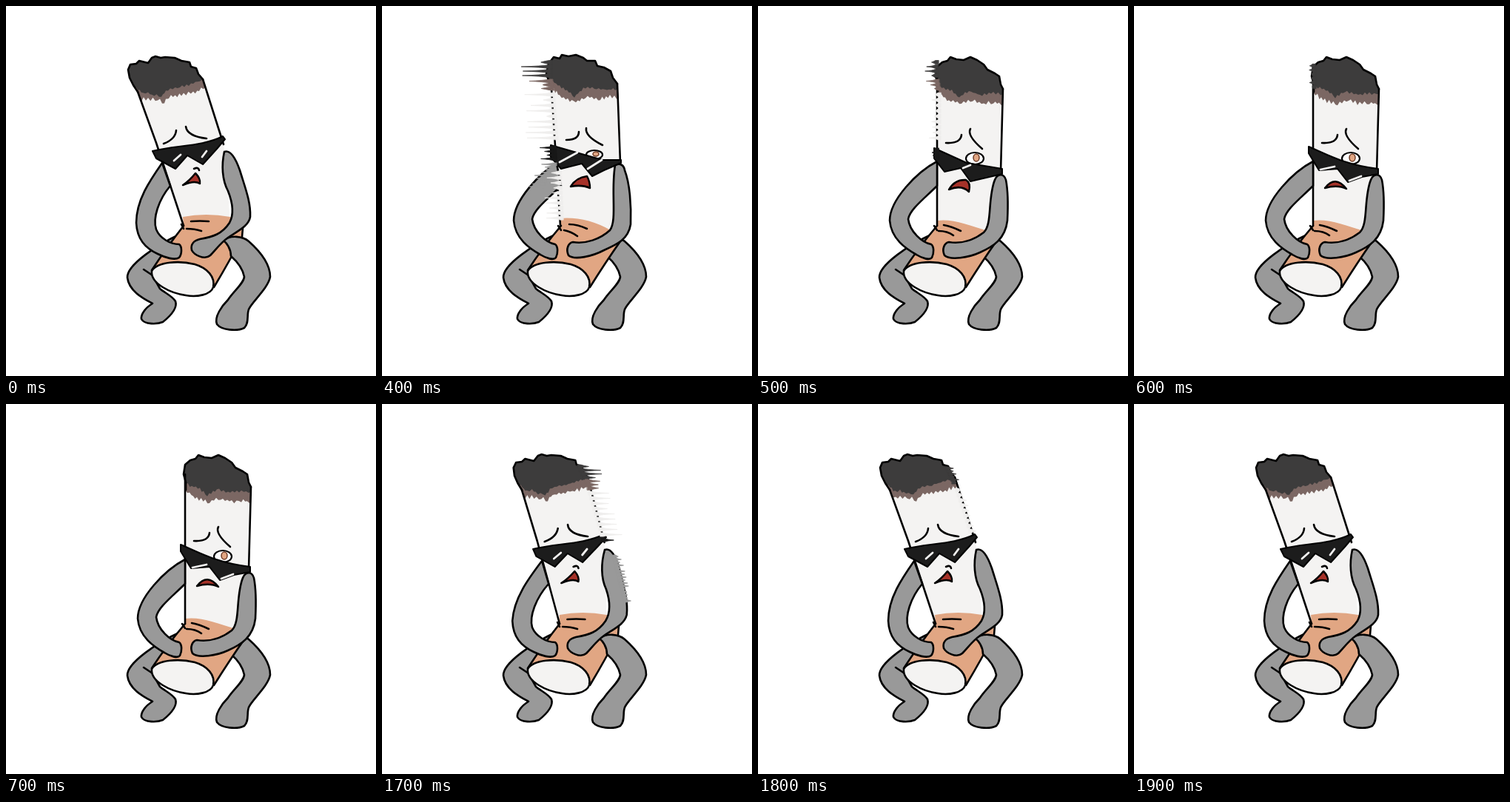
These frames come from a looping animation (500x500 px, 2.7 s). An HTML page:

```html
<!DOCTYPE html>
<html lang="en">
<head>
<meta charset="utf-8">
<title>Sad cigarette</title>
<style>
  html, body { margin: 0; width: 100%; height: 100%; overflow: hidden; background: #fff; }
  svg { display: block; width: 100%; height: 100%; }
  path, polyline, polygon, ellipse { stroke-linecap: round; stroke-linejoin: round; }
  .ink { fill: none; stroke: #000; stroke-width: 2.6; }
  .limb { fill: #999; stroke: #000; stroke-width: 2.6; }
  .paper { fill: #f4f3f2; }
  .filter { fill: #e1a683; }
  .soot { fill: #3d3c3c; }
  .band { fill: #7b6763; }
  .shade { fill: #1c1c1c; stroke: #000; stroke-width: 2; }
  .glint { fill: none; stroke: #f4f3f2; stroke-width: 2.8; }
  .mouth { fill: #a63229; stroke: #000; stroke-width: 2.5; }
  .pose { visibility: hidden; animation: 2700ms step-end infinite; }
  #rest { animation-name: rest; }
  #swing { animation-name: swing; }
  #brake { animation-name: brake; }
  #settle { animation-name: settle; }
  #turned { animation-name: turned; }
  #back { animation-name: back; }
  #land { animation-name: land; }
  @keyframes rest { 0% { visibility: visible } 14.8148% { visibility: hidden } 70.3704%, 100% { visibility: visible } }
  @keyframes swing { 0% { visibility: hidden } 14.8148% { visibility: visible } 18.5185%, 100% { visibility: hidden } }
  @keyframes brake { 0% { visibility: hidden } 18.5185% { visibility: visible } 22.2222%, 100% { visibility: hidden } }
  @keyframes settle { 0% { visibility: hidden } 22.2222% { visibility: visible } 25.9259%, 100% { visibility: hidden } }
  @keyframes turned { 0% { visibility: hidden } 25.9259% { visibility: visible } 62.963%, 100% { visibility: hidden } }
  @keyframes back { 0% { visibility: hidden } 62.963% { visibility: visible } 66.6667%, 100% { visibility: hidden } }
  @keyframes land { 0% { visibility: hidden } 66.6667% { visibility: visible } 70.3704%, 100% { visibility: hidden } }
</style>
</head>
<body>
<svg id="stage" viewBox="0 0 500 500"></svg>
<script>
let seed = 7;
const random = () => (seed = (seed * 16807) % 2147483647) / 2147483647;
const path = (cls, d) => `<path class="${cls}" d="${d}"/>`;

// Ragged line through the given points.
function jag(text, size) {
  const points = text.split(' ').map(p => p.split(',').map(Number));
  const out = [points[0]];
  for (let i = 1; i < points.length; i++) {
    const [ax, ay] = points[i - 1], [bx, by] = points[i];
    const count = Math.max(1, Math.round(Math.hypot(bx - ax, by - ay) / 3));
    for (let k = 1; k <= count; k++) {
      const f = k / count, last = i === points.length - 1 && k === count;
      out.push([ax + (bx - ax) * f, ay + (by - ay) * f + (last ? 0 : (k % 2 ? size : -size) * random())]);
    }
  }
  return out.map(p => p.map(v => v.toFixed(1)).join()).join(' ');
}

// Horizontal speed spikes along an edge; a negative reach points left.
// Wide steps leave bits of the outline between the spikes.
function smear(x0, y0, x1, y1, reach, color, step = 4) {
  const inset = Math.sign(reach) * 4, rows = Math.max(1, Math.round((y1 - y0) / step));
  const half = Math.min(step, 5) / 2;
  let d = '';
  for (let i = 0; i < rows; i++) {
    const f = (i + .5) / rows, x = x0 + (x1 - x0) * f, y = y0 + (y1 - y0) * f;
    const tip = x + reach * (.2 + .8 * random());
    d += `M${x - inset} ${y - half}H${x}Q${x + reach * .2} ${y - .8} ${tip} ${y}Q${x + reach * .2} ${y + .8} ${x} ${y + half}H${x - inset}Z`;
  }
  return `<path d="${d}" fill="${color}" stroke="${color}" stroke-width=".8"/>`;
}

const leftLeg = path('limb', 'M236 308C205 322 163 350 164 367C166 385 185 395 198 402C188 408 182 417 183 423C187 431 205 430 212 427C222 419 232 408 229 399C225 392 215 388 208 382L198 364Z')
  + path('ink', 'M186 356L198 364');
const rightLeg = path('limb', 'M294 317C303 309 320 311 328 318C345 333 357 350 357 366C354 382 332 400 328 410C325 418 329 428 322 435C312 440 291 438 285 430C281 420 292 405 300 397C308 385 321 375 322 366C320 355 312 345 304 338C304 328 298 320 294 317Z');
const filterEnd = path('paper ', 'M197 358C205 345 235 344 255 349C272 354 283 366 280 380C277 390 258 394 243 391C222 388 195 375 197 358Z')
  + path('ink', 'M197 358C205 345 235 344 255 349C272 354 283 366 280 380C277 390 258 394 243 391C222 388 195 375 197 358Z');

const tilted = {
  body: 'M176 110L264 95L294 185L303 290L240 297L203 185Z',
  leftEdge: 'M178 116L203 185L240 297',
  rightEdge: 'M266 99L294 187',
  ash: '178,116 172,107 167,97 165,86 168,79 176,78 180,74 192,77 197,70 202,68 209,70 215,69 228,70 237,74 248,76 250,82 257,84 260,92 266,99',
  soot: '266,99 262,101 235,110 222,112 216,116 210,122 197,120 192,117 185,118 172,107',
  band: '269,111 253,117 240,119 220,123 214,130 205,127 192,126 183,126 178,116',
  filter: 'M239 285Q270 279 303 285L320 300L319 312Q302 345 281 380L197 357Q220 322 240 297Z',
  filterEdge: 'M237 295L240 301M240 297Q218 325 197 357M320 300L319 312Q302 345 281 380',
  wrinkles: 'M250 291Q262 290 274 291M244 301Q255 301 264 304',
  leftArm: 'M211 212C195 235 176 262 176 293C177 315 188 327 205 335C215 340 228 344 234 340C238 335 238 325 234 322C222 322 208 314 203 302C198 287 206 262 222 243Z',
  rightArm: 'M295 197C303 194 310 205 316 222C323 245 331 265 330 285C328 297 315 303 300 313C290 320 283 330 276 337C268 344 254 336 251 330C249 322 254 317 262 315C280 312 292 308 302 293C309 280 306 265 300 250C292 235 291 215 295 197Z',
  brows: 'M213 186Q229 180 230 168M243 163Q245 176 271 179M254 220Q260 217 261 222',
  eye: '',
  shades: 'M198 196C230 188 265 190 293 176L296 180L285 193L266 214L245 202L229 220L203 206Z',
  glints: 'M227 209L236 201M265 204L271 196',
  mouth: 'M239 242Q248 236 256 226Q263 233 262 240Q255 235 239 242Z',
  legInFront: true
};

const upright = {
  body: 'M242 95L331 112L328 225L312 305L242 297Z',
  leftEdge: 'M242 95V297',
  rightEdge: 'M331 112L328 224',
  ash: '243,116 243,106 240,95 242,82 249,76 256,74 260,69 268,72 278,73 287,69 296,73 305,79 310,86 320,91 326,95 328,106 331,112',
  soot: '331,119 318,118 300,120 285,115 272,123 262,115 243,108',
  band: '331,134 318,130 305,132 290,127 275,132 258,128 243,118',
  filter: 'M242 290C262 287 285 296 311 304L322 318L281 380L197 357L242 297Z',
  filterEdge: 'M238 297L242 303M242 297Q218 325 197 357M322 318Q303 345 281 380',
  wrinkles: 'M251 296Q262 298 274 304M244 304Q256 304 264 310',
  leftArm: 'M242 210C215 224 178 262 178 290C180 315 200 328 214 336C222 341 232 344 235 340C238 334 238 325 234 322C222 320 205 305 203 288C205 275 225 260 242 243Z',
  rightArm: 'M320 235C323 227 332 225 335 235C338 250 338 270 337 290C334 315 318 325 300 333C285 340 260 344 252 337C248 328 252 320 258 319C275 322 292 316 305 306C317 295 310 260 320 235Z',
  brows: 'M254 185Q274 186 275 174M287 166Q282 175 303 193',
  eye: [293, 206, 12, 8],
  shades: 'M236 190C260 200 285 215 330 220V227L308 231L289 238L275 220L250 222L236 199Z',
  glints: 'M252 221L271 217M291 236L307 230',
  mouth: 'M258 246Q272 228 287 247Q275 241 258 246Z',
  legInFront: false
};

const braking = { ...upright,
  shades: 'M238 192L282 212L330 220V227L287 237L274 219L252 224L238 206Z',
  glints: 'M277 219L287 215',
  mouth: 'M258 248Q266 234 281 235Q288 239 285 251Q275 241 258 248Z'
};

const swinging = { ...upright,
  body: 'M226 95L318 105L322 215L310 304L241 297Z',
  leftEdge: 'M229 112L241 297',
  rightEdge: 'M318 105L322 212',
  ash: '228,108 222,92 225,78 232,69 240,71 243,66 252,68 262,66 272,70 277,74 288,74 291,81 300,83 309,88 312,97 318,105',
  soot: '318,112 304,113 290,111 272,111 260,122 245,112 228,100',
  band: '320,125 308,122 295,126 275,122 262,129 240,122 228,108',
  filter: 'M240 287Q275 284 309 303L322 318L281 380L197 357L241 297Z',
  wrinkles: 'M253 295Q264 295 277 301M246 303Q256 305 264 311',
  leftArm: upright.leftArm.replace('M242 210', 'M236 213'),
  rightArm: 'M315 215C322 212 327 215 328 222C335 240 337 270 336 295C333 315 318 322 300 330C285 338 260 344 252 337C248 328 252 320 258 319C275 322 295 315 308 303C318 290 309 250 315 215Z',
  brows: 'M249 181Q266 181 266 170M276 165Q274 176 298 188',
  eye: [287, 201, 11, 6],
  shades: 'M228 188L298 208L323 208V212L300 222L284 230L270 213L242 220L228 204Z',
  glints: 'M240 211L264 198M278 220L297 208',
  mouth: 'M255 244Q262 232 277 230Q281 237 281 246Q270 241 255 244Z'
};

// Leans everything above the hip by shifting points with their height.
function lean(pose, slope) {
  const shift = (_, x, gap, y) => (+x + slope * Math.max(0, 297 - y)).toFixed(1) + gap + y;
  return Object.fromEntries(Object.entries(pose).map(([key, value]) =>
    [key, typeof value === 'string' ? value.replace(/([\d.]+)([ ,])([\d.]+)/g, shift) : value]));
}

function eye([x, y, rx, ry]) {
  return `<ellipse cx="${x}" cy="${y}" rx="${rx}" ry="${ry}" fill="#fff" stroke="#000" stroke-width="2.2"/>
    <ellipse cx="${x + 2}" cy="${y - 1}" rx="4" ry="${ry - 3}" fill="#e1a683" stroke="#6d3b26" stroke-width="1.5"/>`;
}

function figure(p) {
  return (p.legInFront ? '' : rightLeg) + leftLeg
    + path('paper', p.body) + path('filter', p.filter)
    + path('ink', p.filterEdge) + filterEnd + (p.legInFront ? rightLeg : '')
    + `<polygon class="band" points="${p.ash} ${jag(p.band, 3)}"/>`
    + `<polygon class="soot" points="${p.ash} ${jag(p.soot, 2)}"/>`
    + path('ink', p.leftEdge) + path('ink', p.rightEdge)
    + `<polyline class="ink" points="${p.ash}"/>`
    + path('ink', p.wrinkles) + path('limb', p.leftArm) + path('limb', p.rightArm)
    + path('ink', p.brows) + (p.eye && eye(p.eye))
    + path('shade', p.shades) + path('glint', p.glints) + path('mouth', p.mouth);
}

const soot = '#3d3c3c', band = '#7b6763', pale = '#efeeed', black = '#171717', grey = '#999';

function leftSmears(x, reach, drift) {
  return smear(x - 2, 73, x - 3, 97, -reach, soot, 6)
    + smear(x - 2, 99, x + 1, 114, -reach, band, 5)
    + smear(x + 1, 116, x + 1 + drift, 182, -reach * .85, pale, 7);
}

const poses = {
  rest: figure(tilted),
  swing: figure(swinging) + leftSmears(228, 46, 5)
    + smear(231, 189, 232, 209, -22, black, 5)
    + smear(233, 212, 212, 246, -18, grey)
    + smear(238, 222, 241, 290, -20, pale, 7),
  brake: figure(braking) + leftSmears(242, 14, 0) + smear(240, 192, 241, 208, -10, black),
  settle: figure(upright) + smear(241, 78, 242, 112, -5, soot, 6),
  turned: figure(upright),
  back: figure(lean(tilted, .06))
    + smear(267, 82, 277, 102, 28, soot, 5)
    + smear(278, 102, 282, 116, 28, band, 5)
    + smear(282, 117, 300, 180, 26, pale, 7)
    + smear(300, 181, 301, 187, 17, black, 6)
    + smear(315, 204, 331, 268, 9, grey),
  land: figure(tilted)
    + smear(257, 85, 267, 108, 7, soot)
    + smear(270, 113, 290, 175, 7, pale, 7)
};

document.getElementById('stage').innerHTML =
  Object.entries(poses).map(([id, art]) => `<g class="pose" id="${id}">${art}</g>`).join('');
</script>
</body>
</html>
```
